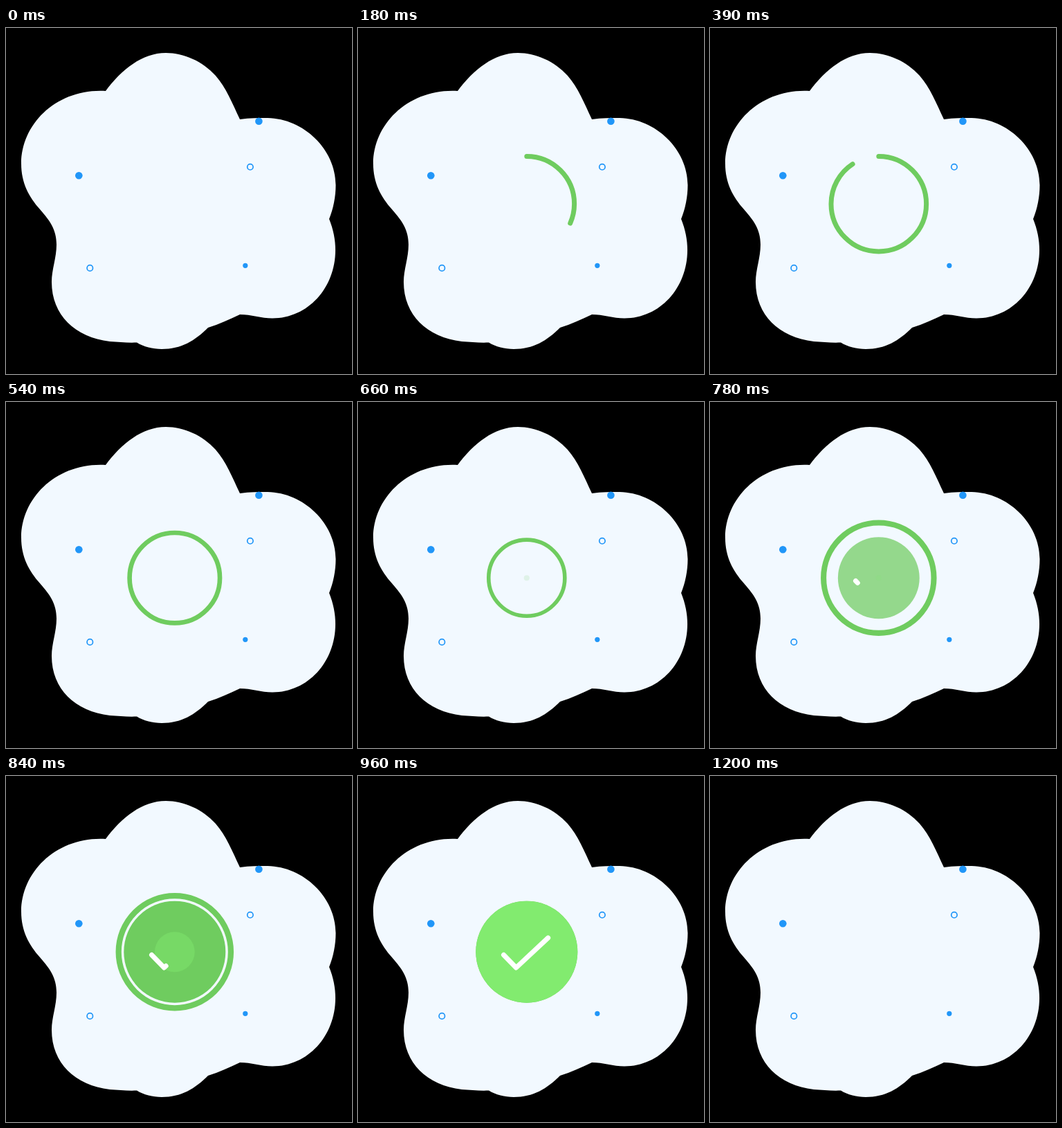
An HTML page for the animation above (1230 ms loop, 500 by 500 pixels).

```html
<!DOCTYPE html>
<html lang="en">
<head>
<meta charset="utf-8">
<title>Success check</title>
<style>
  html, body { margin: 0; width: 100%; height: 100%; overflow: hidden; background: #000; }
  svg { display: block; width: 100%; height: 100%; }
</style>
</head>
<body>
<svg viewBox="0 0 500 500">
  <path fill="#f2f9ff" d="M144 91
    C167 60 197 36 231 36 C257 36 284 48 303 69 C318 86 327 109 338 132
    C352 130 365 130 378 130 C430 131 476.5 175 476.5 227 C476.5 244 473 261 467 276
    C473 291 476 306 476 321 C476 376 436 419.5 385 419.5 C369 419.5 354 414 338 414
    C323 421 308 428 292 433
    C273 452 253 464 225 464 C212 464 199 460.5 189 454.5
    C176 455 163 454 150 453 C100 447 66 415 66 367 C66 349 73 332 73 313
    C73 291 63 278 49 262 C33 244 22 224 22 196 C22 138 74 87 144 91Z"/>
  <g fill="#2196f8">
    <circle cx="105.3" cy="213.3" r="5.3"/>
    <circle cx="365.4" cy="134.7" r="5.3"/>
    <circle cx="345.8" cy="343.3" r="3.6"/>
  </g>
  <g fill="none" stroke="#2196f8" stroke-width="1.7">
    <circle cx="352.9" cy="200.8" r="4.2"/>
    <circle cx="121.3" cy="346.9" r="4.2"/>
  </g>
  <g transform="translate(243.8 254.2)">
    <path id="ring" d="M0 -68.8A68.8 68.8 0 0 1 0 68.8A68.8 68.8 0 0 1 0 -68.8" pathLength="1"
      fill="none" stroke="#6fcc5f" stroke-width="7" stroke-linecap="round"/>
    <circle id="disc" fill="#6fcc5f"/>
    <circle id="glow" fill="#82eb6f"/>
  </g>
  <path id="tick" d="M210.5 258.5L228.5 277L277.6 231.2" pathLength="1"
    fill="none" stroke="#fff" stroke-width="7" stroke-linecap="round" stroke-linejoin="round"/>
</svg>
<script>
  const LOOP = 1230, STEP = 30, RADIUS = 73.5;
  const [ring, disc, glow, tick] = ['ring', 'disc', 'glow', 'tick'].map(id => document.getElementById(id));

  const span = (t, a, b) => Math.min(1, Math.max(0, (t - a) / (b - a)));
  const ease = (t, a, b) => { const x = span(t, a, b); return x * x * (3 - 2 * x); };

  function trim(el, part) {
    el.style.display = part > 0 ? '' : 'none';
    el.setAttribute('stroke-dasharray', part < 1 ? part + ' 2' : 'none');
  }

  function grow(el, t, a, b) {
    el.setAttribute('r', RADIUS * ease(t, a, b));
    el.setAttribute('opacity', span(t, a, b));
  }

  function draw(ms) {
    let t = Math.floor(ms % LOOP / STEP);
    if (t === 40) t = 0; // empty beat before the restart
    const scale = 1 - 0.2 * ease(t, 16, 22) + 0.4 * ease(t, 22, 27) - 0.2 * ease(t, 27, 32);
    trim(ring, ease(t, 0, 16));
    ring.setAttribute('transform', `scale(${scale})`);
    grow(disc, t, 21, 28);
    grow(glow, t, 25, 32);
    trim(tick, ease(t, 25, 33));
  }

  const start = performance.now();
  function loop() {
    draw(performance.now() - start);
    requestAnimationFrame(loop);
  }
  loop();
</script>
</body>
</html>
```
